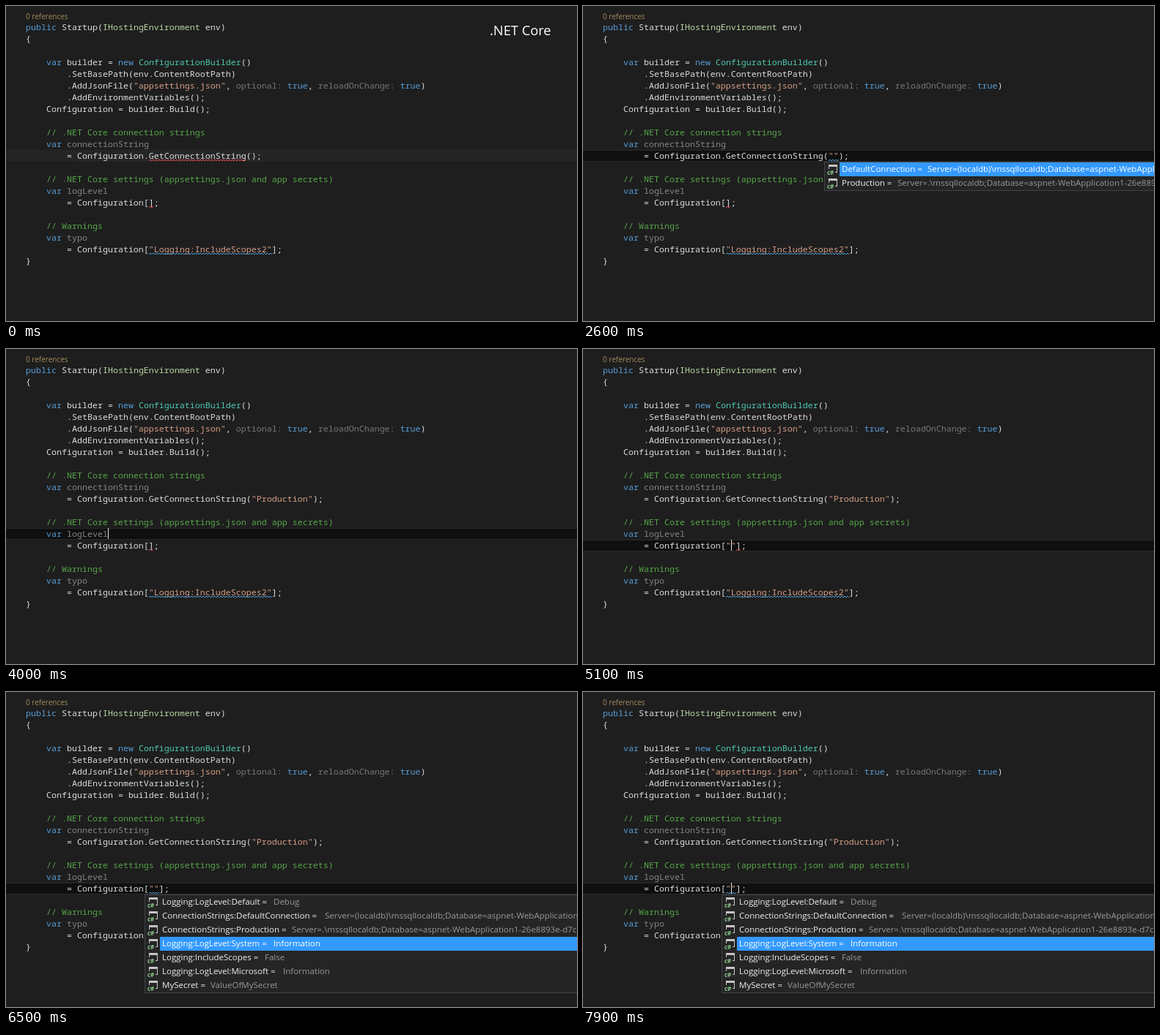
An HTML page that plays this animation: 779 px wide and 431 px high, repeating every 8 s.

```html
<!DOCTYPE html>
<html lang="en">
<head>
<meta charset="utf-8">
<title>Settings completion</title>
<style>
  html, body { margin: 0; width: 100%; height: 100%; overflow: hidden; background: #1e1e1e; }
  svg { display: block; width: 779px; height: 431px; }
  text { white-space: pre; }
  .code { font: 11.667px "Noto Sans Mono", monospace; fill: #dcdcdc; }
  .ui { font: 11.5px "Open Sans", sans-serif; fill: #f1f1f1; }
  .lens { font-size: 10px; fill: #a58a5f; }
  .title { font-size: 18.3px; fill: #fff; }
  .keyword { fill: #569cd6; }
  .type { fill: #4ec9b0; }
  .interface { fill: #b8d7a3; }
  .string { fill: #d69d85; }
  .comment { fill: #57a64a; }
  .unused { fill: #858585; }
  .hint { fill: #777; }
  .value { fill: #999; }
  .selected .value, .selected .key { fill: #fff; }
  .bar { fill: none; }
  .selected .bar { fill: #39f; }
  .mark { font: bold 8px "Open Sans", sans-serif; fill: #8bc98b; }
</style>
</head>
<body>
<svg id="stage" viewBox="0 0 779 431"></svg>
<script>
const LOOP = 8000, LEFT = 27, CHAR = 7, LINE = 16, TOP = 21;
const CONNECTION = 11, SETTING = 15;
const RED = '#f04848', BLUE = '#4f9fdc';

const stage = document.getElementById('stage');

function add(parent, tag, attrs = {}, text = '') {
  const node = document.createElementNS('http://www.w3.org/2000/svg', tag);
  for (const name in attrs) node.setAttribute(name, attrs[name]);
  node.textContent = text;
  return parent.appendChild(node);
}

const show = (node, on) => node.setAttribute('visibility', on ? 'inherit' : 'hidden');
const lineTop = row => TOP + row * LINE;

const syntax = new RegExp([
  /(?<comment>\/\/.*)/, /(?<string>"[^"]*")/, /(?<hint>\b(?:optional|reloadOnChange):)/,
  /(?<keyword>\b(?:public|var|new|true)\b)/, /(?<type>\bConfigurationBuilder\b)/,
  /(?<interface>\bIHostingEnvironment\b)/, /(?<unused>\b(?:connectionString|logLevel|typo)\b)/
].map(rule => rule.source).join('|'), 'g');

function setCode(node, source) {
  node.textContent = '';
  let end = 0;
  for (const match of source.matchAll(syntax)) {
    add(node, 'tspan', {}, source.slice(end, match.index));
    const kind = Object.keys(match.groups).find(name => match.groups[name]);
    add(node, 'tspan', { class: kind }, match[0]);
    end = match.index + match[0].length;
  }
  add(node, 'tspan', {}, source.slice(end));
}

function squiggle(row, x, width, stroke) {
  const d = `M${x} ${lineTop(row) + 15}` + 'l2 -2l2 2'.repeat(Math.floor(width / 4)) + (width % 4 > 1 ? 'l2 -2' : '');
  return add(stage, 'path', { d, stroke, fill: 'none' });
}

function popup(left, top, rows) {
  const group = add(stage, 'g');
  add(group, 'rect', { x: left + .5, y: top - .5, width: 800, height: rows.length * 19 + 1,
    fill: '#252526', stroke: '#434346' });
  const items = rows.map(([key, valueX, value], i) => {
    const y = top + i * 19, item = add(group, 'g');
    add(item, 'rect', { class: 'bar', x: left + 21, y, width: 779 - left - 21, height: 19 });
    add(item, 'rect', { x: left + 6.5, y: y + 3.5, width: 11, height: 10, fill: '#252526', stroke: '#c5c5c5' });
    add(item, 'rect', { x: left + 6, y: y + 3, width: 12, height: 3, fill: '#c5c5c5' });
    add(item, 'rect', { x: left + 3, y: y + 9, width: 12, height: 9, fill: '#252526' });
    add(item, 'text', { class: 'mark', x: left + 4, y: y + 17 }, 'c#');
    add(item, 'text', { class: 'ui key', x: left + 24, y: y + 13 }, key + ' =');
    add(item, 'text', { class: 'ui value', x: valueX, y: y + 13 }, value);
    return item;
  });
  return index => {
    show(group, index !== null);
    items.forEach((item, i) => item.setAttribute('class', i === index ? 'selected' : ''));
  };
}

const connectionLine = arg => `        = Configuration.GetConnectionString(${arg});`;
const settingLine = arg => `        = Configuration[${arg}];`;

const source = `public Startup(IHostingEnvironment env)
{

    var builder = new ConfigurationBuilder()
        .SetBasePath(env.ContentRootPath)
        .AddJsonFile("appsettings.json", optional: true, reloadOnChange: true)
        .AddEnvironmentVariables();
    Configuration = builder.Build();

    // .NET Core connection strings
    var connectionString
${connectionLine('')}

    // .NET Core settings (appsettings.json and app secrets)
    var logLevel
${settingLine('')}

    // Warnings
    var typo
        = Configuration["Logging:IncludeScopes2"];
}`;

const lineBar = add(stage, 'rect', { x: -1, width: 781, height: LINE - 1 });
add(stage, 'text', { class: 'ui lens', x: LEFT, y: 18 }, '0 references');
const title = add(stage, 'text', { class: 'ui title', x: 660, y: 40 }, '.NET Core');

const lines = source.split('\n').map((code, row) => {
  const node = add(stage, 'text', { class: 'code', x: LEFT, y: lineTop(row) + 12 });
  setCode(node, code);
  return node;
});

squiggle(19, 195, 168, BLUE);
const marks = {
  callError: squiggle(CONNECTION, 195, 133, RED),
  callHint: squiggle(CONNECTION, 335, 14, BLUE),
  indexError: squiggle(SETTING, 195, 7, RED),
  movedError: squiggle(SETTING, 209, 7, RED),
  indexHint: squiggle(SETTING, 195, 14, BLUE)
};
const caret = add(stage, 'rect', { width: 1, height: 15, fill: '#e6e6e6' });

const localDb = 'Server=(localdb)\\mssqllocaldb;Database=aspnet-WebApplication1-26e8893e-d7c0';
const prodDb = 'Server=.\\mssqllocaldb;Database=aspnet-WebApplication1-26e8893e-d7c0';
const selectConnection = popup(329, 214, [
  ['DefaultConnection', 470, localDb],
  ['Production', 429, prodDb]
]);
const selectSetting = popup(189, 278, [
  ['Logging:LogLevel:Default', 365, 'Debug'],
  ['ConnectionStrings:DefaultConnection', 435, localDb],
  ['ConnectionStrings:Production', 390, prodDb],
  ['Logging:LogLevel:System', 365, 'Information'],
  ['Logging:IncludeScopes', 353, 'False'],
  ['Logging:LogLevel:Microsoft', 378, 'Information'],
  ['MySecret', 279, 'ValueOfMySecret']
]);

// Each step changes some of the state and keeps the rest.
const steps = [
  [0, { title: true, active: false, row: CONNECTION, caretX: 335, caret: false,
        connection: '', setting: '', connectionPick: null, settingPick: null,
        callError: true, callHint: false, indexError: true, movedError: false, indexHint: false }],
  [900, { title: false }],
  [1200, { active: true, caret: true }],
  [1600, { caret: false }],
  [2000, { connection: '""', caretX: 342, caret: true }],
  [2100, { connectionPick: 0 }],
  [2200, { callHint: true }],
  [2600, { callError: false, caret: false }],
  [2800, { connectionPick: 1 }],
  [3100, { caret: true }],
  [3200, { connectionPick: null }],
  [3300, { connection: '"Production"', caretX: 412, callHint: false }],
  [3500, { row: 12, caretX: 27 }],
  [3700, { row: 13, caretX: 412 }],
  [3900, { row: 14, caretX: 139 }],
  [4100, { row: SETTING, caretX: 209 }],
  [4400, { caretX: 202 }],
  [4600, { caretX: 195 }],
  [5000, { setting: '""', caretX: 202, indexError: false, movedError: true }],
  [5200, { settingPick: 0, indexHint: true }],
  [5500, { caret: false }],
  [5600, { movedError: false }],
  [6000, { settingPick: 1, caret: true }],
  [6300, { settingPick: 2 }],
  [6500, { settingPick: 3, caret: false }],
  [6800, { settingPick: 4 }],
  [7000, { caret: true }],
  [7400, { caret: false }],
  [7600, { settingPick: 3 }],
  [7900, { caret: true }]
];

function draw(state) {
  show(title, state.title);
  lineBar.setAttribute('y', lineTop(state.row) + .5);
  lineBar.setAttribute('fill', state.active ? '#0f0f0f' : '#252526');
  lineBar.setAttribute('stroke', state.active ? '#292929' : '#252526');
  caret.setAttribute('x', state.caretX);
  caret.setAttribute('y', lineTop(state.row));
  show(caret, state.caret);
  setCode(lines[CONNECTION], connectionLine(state.connection));
  setCode(lines[SETTING], settingLine(state.setting));
  for (const name in marks) show(marks[name], state[name]);
  selectConnection(state.connectionPick);
  selectSetting(state.settingPick);
}

const start = performance.now();
let drawn = 0;

function tick() {
  const time = (performance.now() - start) % LOOP;
  const count = steps.filter(([at]) => at <= time).length;
  if (count !== drawn) {
    draw(Object.assign({}, ...steps.slice(0, count).map(([, change]) => change)));
    drawn = count;
  }
  requestAnimationFrame(tick);
}
tick();
</script>
</body>
</html>
```
